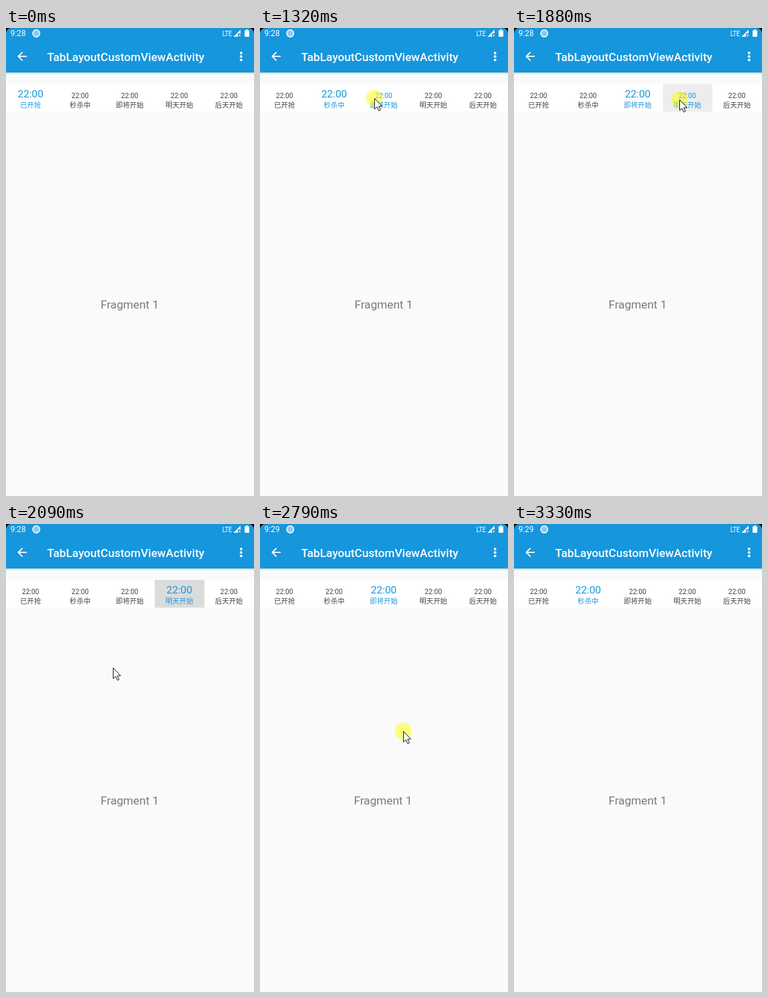
Write an HTML page that moves like this. It is 369 by 694 pixels and loops after 3870 ms.

```html
<!DOCTYPE html>
<html lang="zh-CN">
<head>
<meta charset="utf-8">
<style>
  html, body { margin: 0; height: 100%; overflow: hidden; background: #fafafa; }
  svg { display: block; width: 100%; height: 100%; }
  text { font-family: Roboto, "Noto Sans CJK SC", "Noto Sans CJK", sans-serif; }
  .tab { font-size: 10.3px; text-anchor: middle; fill: #444; }
  .tab.blue { fill: #1a97dc; }
  .tab.big .time { font-size: 15.4px; }
  .page { font-size: 17.14px; text-anchor: middle; fill: #7a7a7a; }
</style>
</head>
<body>
<svg viewBox="0 0 369 694">
  <defs>
    <linearGradient id="shadow" x2="0" y2="1">
      <stop stop-color="#000" stop-opacity=".14"/>
      <stop offset="1" stop-color="#000" stop-opacity="0"/>
    </linearGradient>
  </defs>
  <rect width="369" height="694" fill="#fafafa"/>
  <rect y="66" width="369" height="3.5" fill="url(#shadow)"/>
  <rect width="369" height="66" fill="#1696dc"/>
  <path d="M0 0H8A8 8 0 0 0 0 8ZM369 0H361A8 8 0 0 1 369 8Z"/>

  <g fill="#fff">
    <text id="clock" x="6.4" y="12.3" font-size="12"></text>
    <circle cx="45" cy="8" r="5.2" fill-opacity=".5" stroke="#fff" stroke-width="1.4"/>
    <text x="321.7" y="11.7" font-size="10" letter-spacing="-.5">LTE</text>
    <path d="M338.5 13 349 2.5V8H345V13Z"/>
    <path d="M346 9.5 349 12.5M349 9.5 346 12.5" stroke="#fff"/>
    <path d="M355 3.5H357V2.3H360V3.5H362V13H355Z"/>
    <path transform="translate(13.6 31.8) scale(.857)"
      d="M20 11H7.83l5.59-5.59L12 4l-8 8 8 8 1.41-1.41L7.83 13H20z"/>
    <text x="61.3" y="48.6" font-size="17.14" font-weight="500">TabLayoutCustomViewActivity</text>
    <circle cx="349.8" cy="37" r="1.9"/>
    <circle cx="349.8" cy="42.2" r="1.9"/>
    <circle cx="349.8" cy="47.4" r="1.9"/>
  </g>

  <rect y="83" width="369" height="41" fill="#fff"/>
  <rect id="ripple" y="83" width="73.8" height="41"/>
  <g id="tabs"></g>
  <text id="leaving" class="page" y="416">Fragment 1</text>
  <text id="entering" class="page" y="416">Fragment 1</text>

  <g id="cursor">
    <circle id="press" r="12.3" fill="#ff0" fill-opacity=".5"/>
    <path d="M.5 .5V16.3L4.1 13 6.7 18.7 9.2 17.6 6.7 12H11.5Z" fill="#fff" stroke="#000" stroke-width=".9"/>
  </g>
</svg>

<script>
const LOOP = 3870, STEP = LOOP / 50, WIDTH = 369, TAB_WIDTH = WIDTH / 5, SETTLE = 200;
const byId = id => document.getElementById(id);
const clamp = v => Math.max(0, Math.min(1, v));

// Each gesture moves from one tab to another; times in ms.
const gestures = [
  { from: 0, to: 1, down: 1000, up: 1008 },
  { from: 1, to: 2, down: 1310, up: 1511 },
  { from: 2, to: 3, down: 1775, up: 1918 },
  { from: 3, to: 2, down: 2245, up: 2437, swipe: true },
  { from: 2, to: 1, down: 2780, up: 2979, swipe: true }
];

// Key points of the pointer: time, x, y.
const path = [
  [70, 288, 676], [540, 120, 151], [770, 113, 107], [1080, 113, 107], [1315, 170, 104],
  [1625, 232, 104], [1780, 246, 106], [1920, 246, 106], [2090, 159, 213], [2250, 154, 220],
  [2430, 248, 236], [2786, 213, 307], [2970, 309, 335], [3090, 284, 448], [3260, 288, 625]
];

byId("tabs").innerHTML = ["已开抢", "秒杀中", "即将开始", "明天开始", "后天开始"].map((label, i) => {
  const x = (i + .5) * TAB_WIDTH - .4;
  return `<g class="tab"><text class="time" x="${x}">22:00</text><text x="${x}" y="117.8">${label}</text></g>`;
}).join("");
const tabs = [...byId("tabs").children];

function cursorAt(t) {
  const next = path.findIndex(point => point[0] >= t);
  if (next < 1) return null;
  const [a, b] = [path[next - 1], path[next]];
  const k = (t - a[0]) / (b[0] - a[0]);
  return [1, 2].map(i => Math.round(a[i] + (b[i] - a[i]) * k));
}

function drawTabs(t, { from, to, down, up, swipe }) {
  const selected = t < up ? from : to;
  const tapped = !swipe && t >= down;
  tabs.forEach((tab, i) => {
    const big = i === selected;
    tab.classList.toggle("big", big);
    tab.classList.toggle("blue", big || (tapped && i === to));
    tab.firstChild.setAttribute("y", big ? 102.5 : 103.7);
  });
  const alpha = tapped ? .14 * clamp((t - down - 8) / 150) * clamp((300 - t + up) / 120) : 0;
  byId("ripple").setAttribute("x", to * TAB_WIDTH);
  byId("ripple").setAttribute("fill-opacity", alpha);
}

// The pages follow a swipe, then settle with a quintic ease-out.
function drawPages(t, { from, to, down, up, swipe }) {
  const side = Math.sign(to - from) * WIDTH;
  const dragged = swipe && t > down ? cursorAt(Math.min(t, up))[0] - cursorAt(down)[0] : 0;
  const x = 184 + (side + dragged) * (1 - clamp((t - up) / SETTLE)) ** 5;
  byId("entering").setAttribute("x", x);
  byId("leaving").setAttribute("x", x - side);
}

function drawCursor(t, { down, up }) {
  const point = cursorAt(t);
  byId("cursor").style.display = point ? "" : "none";
  if (point) byId("cursor").setAttribute("transform", `translate(${point})`);
  byId("press").style.display = t >= down && t < up ? "" : "none";
}

function draw(t) {
  const gesture = gestures.findLast(g => g.down <= t) ?? gestures[0];
  drawTabs(t, gesture);
  drawPages(t, gesture);
  drawCursor(t, gesture);
  byId("clock").textContent = t < 2700 ? "9:28" : "9:29";
}

function tick() {
  draw(Math.floor((performance.now() % LOOP + 8) / STEP) * STEP);
  requestAnimationFrame(tick);
}
tick();
</script>
</body>
</html>
```
